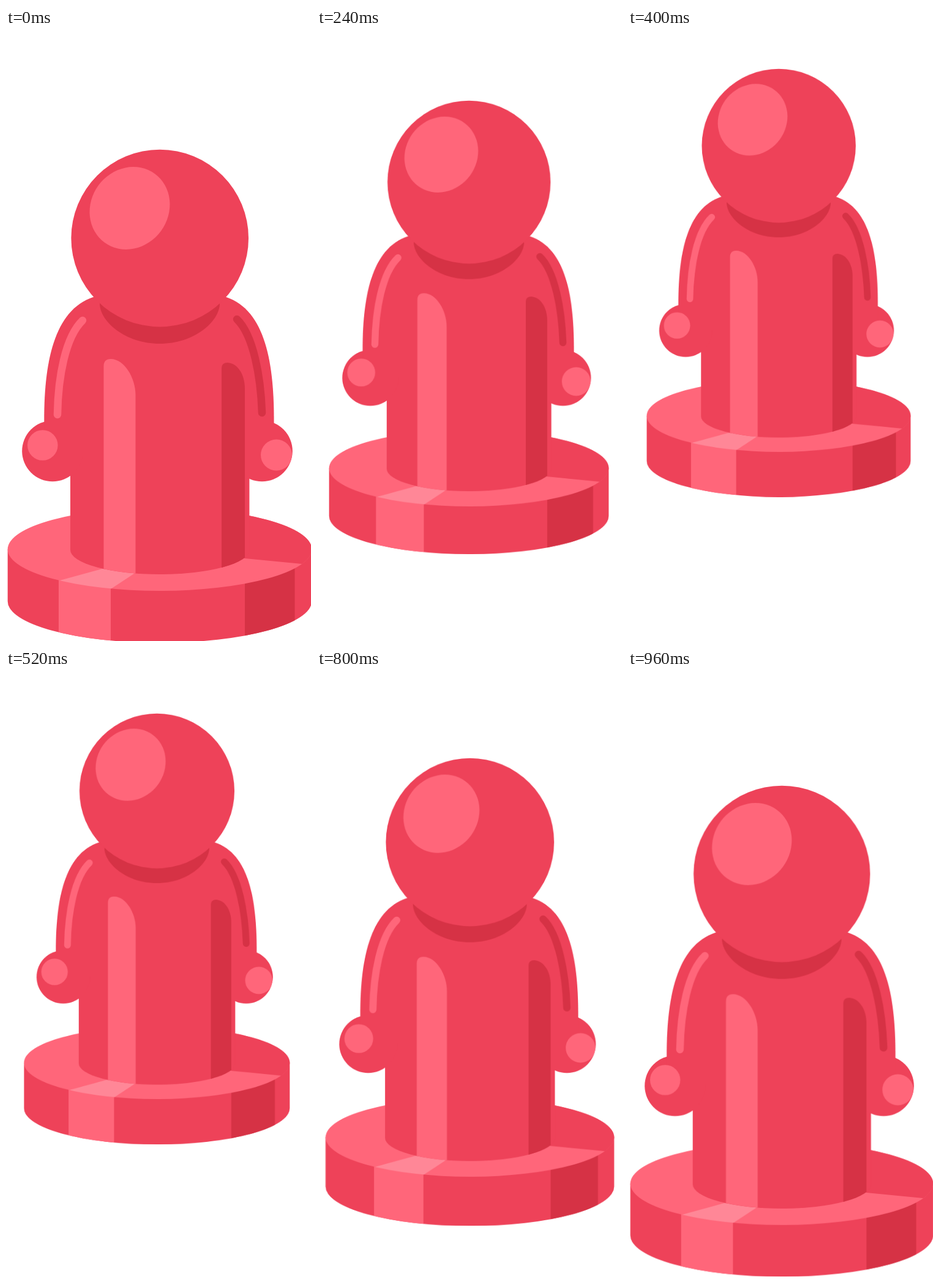
An HTML page for the animation above (1 s loop, 498 px wide and 1002 px high).

```html
<!DOCTYPE html>
<html lang="en">
<head>
<meta charset="utf-8">
<title>Bouncing pawn</title>
<style>
  html, body { margin: 0; width: 100%; height: 100%; overflow: hidden; background: #fff; }
  svg { display: block; width: 100%; height: 100%; }
  .main  { fill: #ee4259; }
  .light { fill: #ff667a; }
  .pale  { fill: #ff8797; }
  .dark  { fill: #d63245; }
  .gleam { fill: none; stroke-width: 12.5; stroke-linecap: round; }

  /* The pawn rises and shrinks, then drops back, in 40 ms steps. */
  #pawn {
    transform-origin: 251px 199px;
    animation: hop 1s -4ms infinite;
  }
  @keyframes hop {
    0%   { transform: translate(0, 0) scale(1); animation-timing-function: steps(6); }
    24%  { transform: translate(-3px, -80px) scale(.9195); animation-timing-function: steps(4); }
    40%  { transform: translate(-5px, -132px) scale(.868); animation-timing-function: steps(1); }
    44%  { transform: translate(-5.6px, -149px) scale(.851); animation-timing-function: steps(2); }
    52%  { transform: translate(-4.7px, -126px) scale(.8738); animation-timing-function: steps(4); }
    68%  { transform: translate(-2.9px, -85px) scale(.9153); animation-timing-function: steps(3); }
    80%  { transform: translate(-1.4px, -53px) scale(.9485); animation-timing-function: steps(4); }
    96%  { transform: translate(0, -8px) scale(.9955); animation-timing-function: steps(1); }
    100% { transform: translate(0, 0) scale(1); }
  }
</style>
</head>
<body>
<svg viewBox="0 0 498 1002">
  <defs>
    <path id="side" d="M2.7 852V937A248.3 68 0 0 0 499.3 937V852Z"/>
    <ellipse id="top" cx="251" cy="852" rx="248.3" ry="68"/>
    <path id="column" d="M105 600V853A146.2 40 0 0 0 397.4 853V600Z"/>
    <circle id="hand" cx="418" cy="691.5" r="49.8"/>
    <clipPath id="inSide"><use href="#side"/></clipPath>
    <clipPath id="inTop"><use href="#top"/></clipPath>
    <clipPath id="inColumn"><path d="M105 500V853A146.2 40 0 0 0 397.4 853V500Z"/></clipPath>
    <clipPath id="inHand"><use href="#hand"/></clipPath>
  </defs>

  <g id="pawn">
    <!-- base -->
    <use href="#side" class="main"/>
    <g clip-path="url(#inSide)">
      <path class="light" d="M86 852H171V1010H86Z"/>
      <path class="dark" d="M390 852H471.5V1010H390Z"/>
    </g>
    <use href="#top" class="light"/>
    <g clip-path="url(#inTop)">
      <path class="main" d="M380 780H500V878L483 876L380 866Z"/>
      <path class="pale" d="M157 884L212 890L171 917V925H86V903.5Z"/>
    </g>

    <!-- body -->
    <g class="main">
      <use href="#column"/>
      <use href="#hand"/>
      <use href="#hand" x="-342"/>
      <path d="M62.3 690V640C62.3 540 81 455 149 438H353C420.5 455 437.5 540 437.5 640V690Z"/>
    </g>
    <g clip-path="url(#inColumn)">
      <path class="light" d="M159.5 900V553Q159.5 541 171 541C193 541 211.5 572 211.5 600V900Z"/>
      <path class="dark" d="M352 900V556Q352 547 362 547C378 548 390 566 390 590V900Z"/>
    </g>
    <path class="gleam" stroke="#ff667a" d="M84 632C85 570 97 505 125 478"/>
    <path class="gleam" stroke="#d63245" d="M377 476C404 502 416 570 418 629"/>
    <circle class="light" cx="59.8" cy="682" r="24.8"/>
    <circle class="light" cx="441.5" cy="698" r="25.5" clip-path="url(#inHand)"/>

    <!-- head -->
    <path class="dark" d="M153 450C153 480 195 516 251 516C307 516 349 480 349 450Z"/>
    <circle class="main" cx="251.2" cy="343.6" r="144.8"/>
    <ellipse class="light" rx="69.6" ry="63.2" transform="translate(202 294.5) rotate(-54)"/>
  </g>
</svg>
</body>
</html>
```
